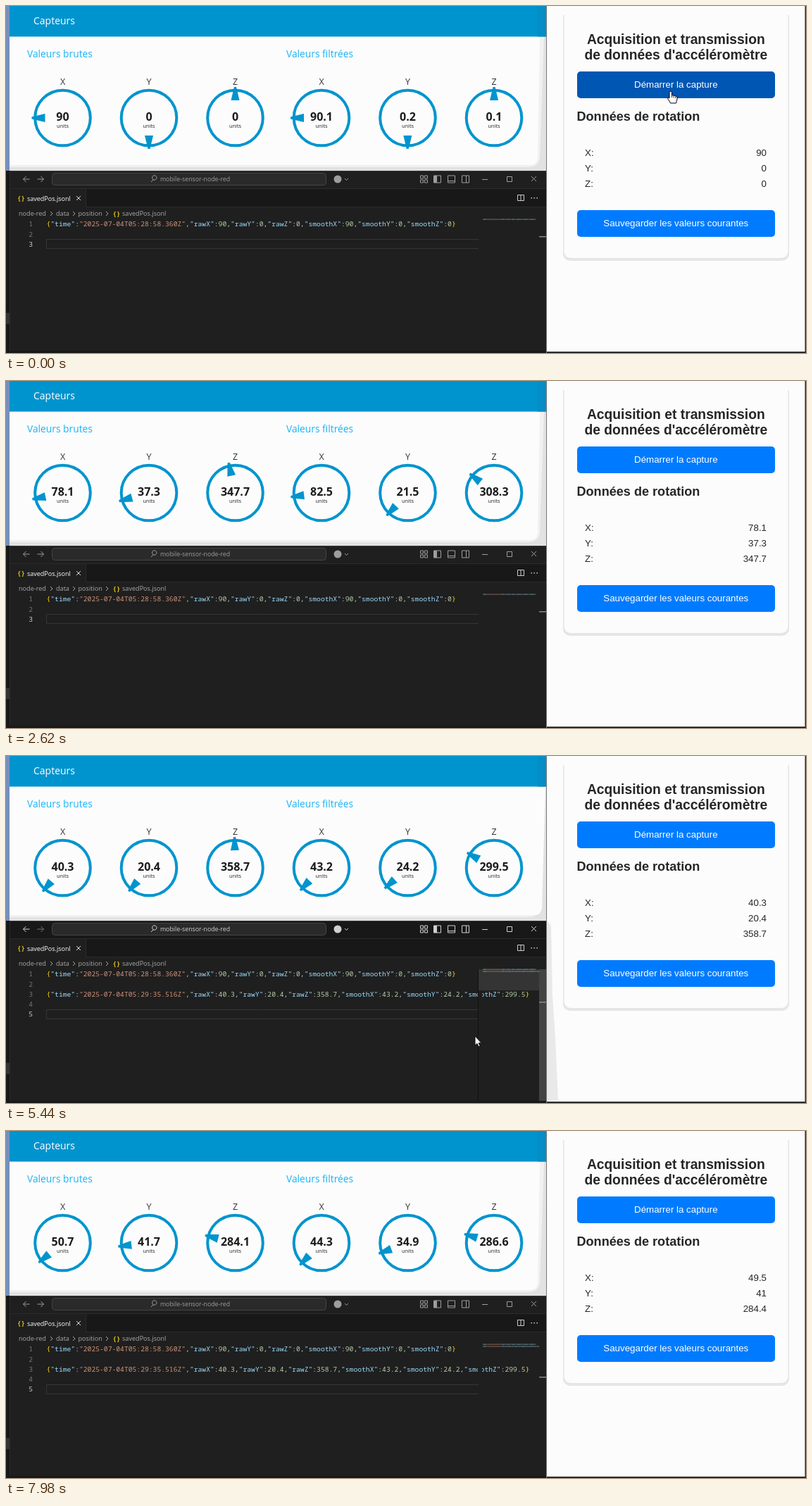
Recreate the animation shown at these times as an HTML page with a canvas. Size 1136 by 493 pixels, loop 8000 ms.

```html
<!DOCTYPE html>
<html lang="fr">
<head>
<meta charset="utf-8">
<title>Capteurs</title>
<style>
html, body { margin: 0; width: 100%; height: 100%; overflow: hidden; background: #fcfcfc; }
canvas { display: block; }
</style>
</head>
<body>
<canvas id="stage" width="1136" height="493"></canvas>
<script>
const ctx = document.getElementById('stage').getContext('2d', { alpha: false });
const LOOP = 8000, STEP = 40;
const UI = '"Open Sans", "Noto Sans", sans-serif';
const ARIAL = '"Liberation Sans", Arial, sans-serif';
const MONO = '"Noto Sans Mono", "DejaVu Sans Mono", monospace';
const BLUE = '#0094ce', PAPER = '#fcfcfc';

// time, [raw X Y Z, filtered X Y Z], needle positions when they lag behind the numbers
const rest = [90, 0, 0, 90.1, .2, .1];
const saved = [40.3, 20.4, -1.3, 43.2, 24.2, 299.5];
const readings = [
  [0, rest], [2149, rest],
  [2150, [90.7, -6.9, 8.3, 90.2, -7.9, 14.9], [90.7, -13.2, 19.5, 90.2, -6.4, 11.5]],
  [2340, [85.6, 11, 0, 88, 2, 9]],
  [2620, [78.1, 37.3, -12.3, 82.5, 21.5, 308.3]],
  [2930, [54.5, 28.2, -6, 60.4, 26.1, 302]],
  [3300, saved], [6440, saved],
  [6780, [35.1, 18.1, 21.8, 36.3, 20.4, 42.2]],
  [7050, [39.2, 23.5, 0, 37.4, 22.1, 14.3]],
  [7400, [43.4, 31.2, -30, 39.6, 27.3, 268.5]],
  [7940, [49.5, 41, -75.6, 43.8, 34.2, 286.1]],
  [7980, [50.7, 41.7, -75.9, 44.3, 34.9, 286.6]],
];
// pointer runs; it is hidden between them
const pointerRuns = [
  [[0, 944, 121], [60, 944, 121], [130, 968, 412]],
  [[3180, 1012, 462], [3300, 1000, 405], [3400, 975, 365], [3500, 966, 311],
   [4240, 966, 311], [4600, 666, 398], [5440, 666, 398], [5700, 683, 425],
   [6080, 676, 434], [6440, 676, 434], [6540, 690, 484]],
];

const clamp01 = x => Math.max(0, Math.min(1, x));
const ramp = (t, a, b) => clamp01((t - a) / (b - a));
const mix = (a, b, k) => a + (b - a) * k;

function segment(keys, t) {
  let i = 0;
  while (i < keys.length - 2 && keys[i + 1][0] <= t) i++;
  return [keys[i], keys[i + 1]];
}
function reading(t, needles) {
  const [a, b] = segment(readings, t);
  const stepped = t >= b[0] ? b[0] : a[0] + Math.floor((t - a[0]) / STEP) * STEP;
  const from = needles && a[2] || a[1];
  return from.map((v, i) => mix(v, b[1][i], ramp(stepped, a[0], b[0])));
}
const format = (v, i) => String(+(i % 3 === 2 ? (v + 360) % 360 : v).toFixed(1));

function rect(x, y, w, h, color) { ctx.fillStyle = color; ctx.fillRect(x, y, w, h); }
function round(x, y, w, h, r, fill, stroke) {
  ctx.beginPath();
  ctx.roundRect(x, y, w, h, r);
  if (fill) { ctx.fillStyle = fill; ctx.fill(); }
  if (stroke) { ctx.strokeStyle = stroke; ctx.lineWidth = 1; ctx.stroke(); }
}
function path(d, stroke, fill, x = 0, y = 0, width = 1) {
  const p = new Path2D(d);
  ctx.save();
  ctx.translate(x, y);
  if (fill) { ctx.fillStyle = fill; ctx.fill(p); }
  if (stroke) { ctx.strokeStyle = stroke; ctx.lineWidth = width; ctx.stroke(p); }
  ctx.restore();
}
function text(s, x, y, font, color, align = 'left') {
  ctx.font = font;
  ctx.fillStyle = color;
  ctx.textAlign = align;
  ctx.fillText(s, x, y);
}

function gauge(i, value, needle) {
  const x = 80.5 + 122.5 * i, y = 159;
  text('XYZ'[i % 3], x, 112, `12.5px ${UI}`, '#333', 'center');
  ctx.strokeStyle = ctx.fillStyle = BLUE;
  ctx.lineWidth = 4;
  ctx.beginPath();
  ctx.arc(x, y, 39.3, 0, 7);
  ctx.stroke();
  // X spans a turn over 360, Y over 180, both with zero at the bottom
  const degrees = [180 + needle, 180 + 2 * needle, needle][i % 3];
  ctx.save();
  ctx.translate(x, y);
  ctx.rotate(degrees * Math.PI / 180);
  ctx.fill(new Path2D('M-6-25L-1.5-44H1.5L6-25Z'));
  ctx.restore();
  text(value, x, 163, `bold 16px ${UI}`, '#1c1c1c', 'center');
  text('units', x, 173, `7.4px ${UI}`, '#222', 'center');
}

function dashboard(t, focused) {
  rect(0, 0, 5, 234, '#7590bd');
  rect(5, 0, 763, 234, '#f1f1f1');
  path('M767 44V234H5V229H740Q757 229 758 215L764 44Z', null, '#e2e2e2');
  path(focused ? 'M5 43H766L761 216Q760 226 750 226H5Z'
               : 'M5 43H758L755 216Q754 226 744 226H5Z', null, PAPER);
  rect(5, 0, 763, 43.5, BLUE);
  rect(755, 0, 13, 43.5, '#058dc5');
  text('Capteurs', 39, 26, `500 14px ${UI}`, '#fff');
  text('Valeurs brutes', 30, 73, `500 13.8px ${UI}`, '#1ab3f5');
  text('Valeurs filtrées', 398, 73, `500 13.8px ${UI}`, '#1ab3f5');
  const values = reading(t), needles = reading(t, true);
  values.forEach((v, i) => gauge(i, format(v, i), needles[i]));
}

const jsonLine = (time, keys) => `{"time":"${time}",` + keys + '}';
const firstLine = jsonLine('2025-07-04T05:28:58.360Z',
  '"rawX":90,"rawY":0,"rawZ":0,"smoothX":90,"smoothY":0,"smoothZ":0');
const secondLine = jsonLine('2025-07-04T05:29:35.516Z',
  '"rawX":40.3,"rawY":20.4,"rawZ":358.7,"smoothX":43.2,"smoothY":24.2,"smoothZ":299.5');

function tokenColor(s) {
  if (/^[{}]/.test(s)) return '#ffd700';
  if (/^"\d/.test(s)) return '#ce9178';
  if (s[0] === '"') return '#9cdcfe';
  return /\d/.test(s) ? '#b5cea8' : '#ccc';
}
function code(line, y, miniY) {
  ctx.save();
  ctx.beginPath();
  ctx.rect(57, 300, 613, 190);
  ctx.rect(676, 300, 81, 190);
  ctx.clip();
  let x = 57.5, miniX = 677;
  for (const s of line.match(/"[^"]*"|[\d.]+|[{}:,]/g)) {
    text(s, x, y, `9.7px ${MONO}`, tokenColor(s));
    x += ctx.measureText(s).width;
    ctx.globalAlpha = .5;
    rect(miniX, miniY, s.length * .76 - .2, 1.2, tokenColor(s));
    ctx.globalAlpha = 1;
    miniX += s.length * .76;
  }
  ctx.restore();
}

function titleBar(focused) {
  const ink = focused ? '#d0d0d0' : '#9d9d9d';
  rect(5, 234, 763, 26, focused ? '#181818' : '#1f1f1f');
  rect(5, 234, 763, 1, '#383838');
  path('M9 0H0M4-4L0 0L4 4', ink, null, 24.5, 246);
  path('M0 0H9M5-4L9 0L5 4', focused ? '#777' : ink, null, 44.5, 246);
  round(65.5, 237.5, 389, 17, 4, '#2a2a2a', '#454545');
  path('M7-1A3.2 3.2 0 1 1 7-1.1M2.5 1.5L-1 5', ink, null, 207, 245);
  text('mobile-sensor-node-red', 268.5, 249.3, `8.8px ${UI}`, ink, 'center');
  ctx.fillStyle = ink;
  ctx.beginPath();
  ctx.arc(471, 246, 5.5, 0, 7);
  ctx.fill();
  path('M0 0L2.5 2.5L5 0', ink, null, 481, 245);
  path('M0 0H4V4H0ZM0 6H4V10H0ZM6 0H10V4H6ZM6 6H10V10H6Z', ink, null, 588.5, 241);
  for (const x of [607.5, 627.5, 647.5]) path('M0 0H10V10H0Z', ink, null, x, 241);
  rect(608, 241, 4, 10, ink);
  path('M628 248.5H637M653.5 241V251', ink);
  path('M676 246.5H684M711.5 242.5H718.5V249.5H711.5ZM746 242L753 249M753 242L746 249', ink);
}

function editor(t, focused) {
  const stored = t >= 4320, active = stored ? 5 : 3;
  rect(0, 234, 768, 259, '#181818');
  rect(0, 436, 5, 16, '#333');
  rect(5, 234, 763, 256, '#1f1f1f');
  titleBar(focused);
  rect(5, 260, 763, 26, '#181818');
  rect(5, 259, 763, 1, '#2b2b2b');
  rect(113, 285, 654, 1, '#2b2b2b');
  rect(6, 260, 107, 26, '#1f1f1f');
  rect(113, 260, 1, 26, '#2b2b2b');
  rect(5, 234, 1, 256, '#2b2b2b');

  text('{}', 16, 276, `bold 9px ${MONO}`, '#e2c41f');
  text('savedPos.jsonl', 30, 276.5, `9px ${UI}`, '#fff');
  path('M0 0L6 6M6 0L0 6', '#ddd', null, 100, 270);
  path('M726.5 268.5H735.5V276.5H726.5ZM731 268V277', '#ccc');
  for (const x of [746, 750, 754]) rect(x - .5, 272, 1.5, 1.5, '#ccc');

  const crumbs = { 18: 'node-red', 71: 'data', 102.5: 'position', 165: 'savedPos.jsonl' };
  for (const x in crumbs) text(crumbs[x], +x, 298, `9.1px ${UI}`, '#a9a9a9');
  for (const x of [63, 95, 142]) path('M0-3L3 0L0 3', '#a9a9a9', null, x, 295);
  text('{}', 151.5, 298, `bold 9px ${MONO}`, '#e2c41f');

  const top = 303.5 + 14.25 * (active - 1);
  path(`M671 ${Math.round(top) - .5}H57.5V${Math.round(top) + 12.5}H671`, '#363636');
  if (focused) {
    rect(670, 303, 1, 187, '#111');
    rect(671, 303, 86, 30, '#343434');
    rect(757, 303, 10, 187, '#434343');
  }
  for (let n = 1; n <= active; n++)
    text(n, 38, 313.3 + 14.25 * (n - 1), `9.7px ${MONO}`, n === active ? '#ccc' : '#6e7681', 'right');
  code(firstLine, 313.3, 302.5);
  if (stored) code(secondLine, 341.8, 305.5);
  rect(757, stored ? 349 : 327, 10, 1.5, '#8a8a8a');
  if (focused && (t < 5130 || t >= 5630 && t < 6440)) rect(57, 360, 1.5, 14, '#aeafad');
}

function button(label, y, hover) {
  round(811, y, 281, 38, 5, `rgb(0,${mix(123, 86, hover)},${mix(255, 179, hover)})`);
  text(label, 951.3, y + 23.3, `13.33px ${ARIAL}`, '#fff', 'center');
}

function phonePage(t, focused) {
  rect(768, 0, 368, 493, PAPER);
  if (focused) path('M768 234L774 241L776 340L780 400L784 490H768Z', null, '#e9e9e9');
  round(791, 0, 321, 362, 10, '#e5e5e5');
  round(792.5, -10, 318, 368, 9, PAPER);
  rect(785, 0, 335, 13, PAPER);
  rect(767, 0, 1, 493, '#77777c');
  rect(768, 491, 368, 2, '#2b2b2e');
  rect(1134.5, 0, 1.5, 493, '#2b2b2e');

  text('Acquisition et transmission', 951.3, 54, `bold 19.3px ${ARIAL}`, '#262626', 'center');
  text("de données d'accéléromètre", 951.3, 76, `bold 19.3px ${ARIAL}`, '#262626', 'center');
  text('Données de rotation', 810.5, 163, `bold 18.1px ${ARIAL}`, '#262626');
  button('Démarrer la capture', 93, 1 - ramp(t, 60, 140));
  button('Sauvegarder les valeurs courantes', 290, ramp(t, 3440, 3600) - ramp(t, 4240, 4400));

  const values = reading(Math.min(t, 7940));
  [0, 1, 2].forEach(i => {
    const y = 213 + 22 * i;
    text('XYZ'[i] + ':', 822, y, `13.33px ${ARIAL}`, '#262626');
    text(format(values[i], i), 1080, y, `13.33px ${ARIAL}`, '#262626', 'right');
  });
}

function pointer(t) {
  const run = pointerRuns.find(r => t >= r[0][0] && t < r[r.length - 1][0]);
  if (!run) return;
  const [a, b] = segment(run, t), k = ramp(t, a[0], b[0]);
  const x = mix(a[1], b[1], k), y = mix(a[2], b[2], k);
  const over = x > 811 && x < 1092 && (y > 93 && y < 131 || y > 290 && y < 328);
  if (over) {
    path('M-2 1Q0-1 1.5 1V6Q3 5 4 6.5Q6 5.5 6.5 7.2Q9 6.5 9 9V12Q8 14 7.5 17H-.5Q-1-15 -1 15L-4.5 10.5Q-5 8-2 10Z'
      .replace('Q-1-15 -1 15', 'Q-1 16-1.5 15'), '#000', '#fff', x, y);
    path('M1.5 6V9M4 7V9.5M6.5 8V10', '#000', null, x, y, .8);
  } else {
    path('M0 0V13L3 10.3L5 15L7 14L5 9.7H9Z', '#000', '#fff', x, y, .8);
  }
}

function draw(now) {
  const t = now % LOOP;
  const focused = t >= 4540 && t < 6500;
  dashboard(t, focused);
  editor(t, focused);
  phonePage(t, focused);
  pointer(t);
}

const start = performance.now();
(function tick() {
  draw(performance.now() - start);
  requestAnimationFrame(tick);
})();
</script>
</body>
</html>
```
